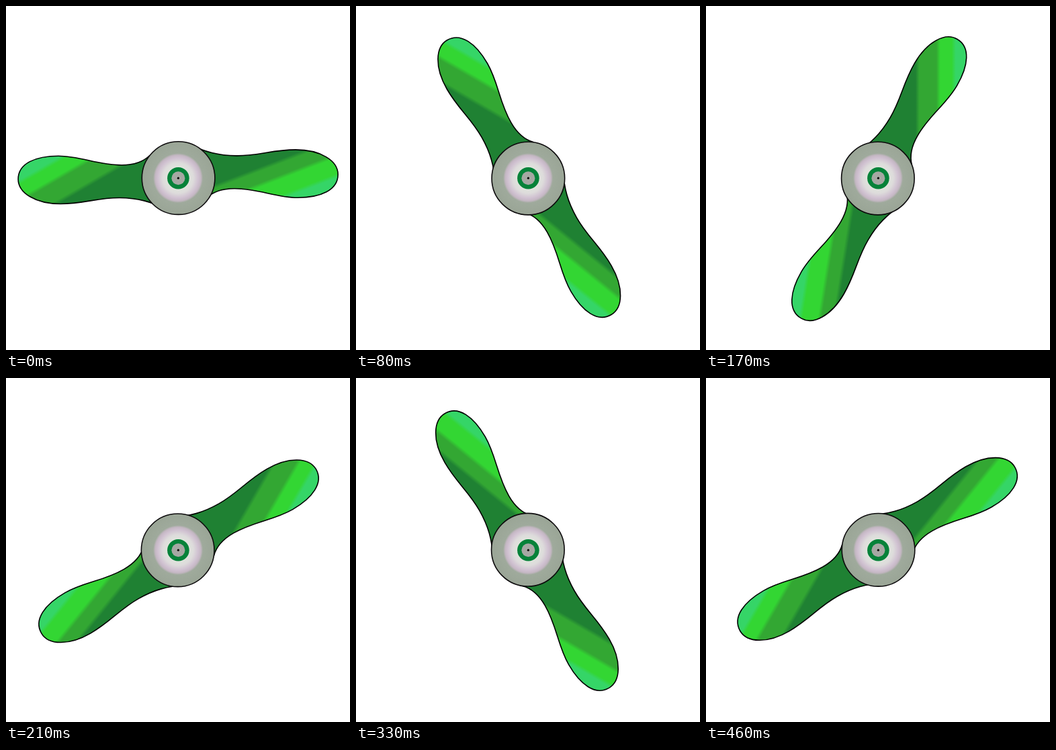
An HTML page with a canvas that plays this animation: 512x512 px, repeating every 0.5 s.

```html
<!DOCTYPE html>
<html lang="en">
<head>
<meta charset="utf-8">
<title>Propeller</title>
<style>
  html, body { margin: 0; width: 100%; height: 100%; overflow: hidden; background: #fff; }
  canvas { display: block; width: 512px; height: 512px; }
</style>
</head>
<body>
<canvas id="stage" width="512" height="512"></canvas>
<script>
const ctx = document.getElementById('stage').getContext('2d');
const LOOP = 500;
const STEP_TIMES = [0, 40, 80, 130, 170, 210, 250, 290, 330, 380, 420, 460];
const CENTER = 256.1;
const SHADES = ['#1f8133', '#33a733', '#33d633', '#35d567'];

const bladePath = new Path2D(
  'M17 -48.5 C40 -37 60 -31.5 87 -31.3 C120 -31 140 -40.3 175 -40.3 ' +
  'C212 -40.3 238 -24 238 -3.5 C238 20 212 31 178 31 ' +
  'C145 31 120 17.5 84 17.5 C68 17.5 53 21 42 32');

// Colour bands at a slant, with slightly soft edges at the given distances.
function bandGradient(degrees, edges) {
  const length = 140, soft = 3;
  const angle = degrees * Math.PI / 180;
  const gradient = ctx.createLinearGradient(
    0, 0, length * Math.sin(angle), length * Math.cos(angle));
  edges.forEach((edge, i) => {
    gradient.addColorStop((edge - soft) / length, SHADES[i]);
    gradient.addColorStop((edge + soft) / length, SHADES[i + 1]);
  });
  return gradient;
}

function hubGradient() {
  const radius = 54.5;
  const gradient = ctx.createRadialGradient(0, 0, 0, 0, 0, radius);
  const stops = [[16, '#e0e4dd'], [23, '#dddbdb'], [30, '#d0c1d1'],
                 [34, '#c4b7c3'], [37, '#9faa9c'], [54, '#9aa596']];
  stops.forEach(([r, color]) => gradient.addColorStop(r / radius, color));
  return gradient;
}

const rightFill = bandGradient(21, [33, 55, 83]);
const leftFill = bandGradient(30, [57, 88, 111]);
const hubFill = hubGradient();

function disc(x, y, radius, fill, stroke) {
  ctx.beginPath();
  ctx.arc(x, y, radius, 0, 2 * Math.PI);
  ctx.fillStyle = fill;
  ctx.fill();
  if (stroke) {
    ctx.strokeStyle = stroke;
    ctx.stroke();
  }
}

function drawBlade(fill) {
  ctx.fillStyle = fill;
  ctx.fill(bladePath);
  ctx.strokeStyle = '#000';
  ctx.stroke(bladePath);
}

function draw(time) {
  const step = STEP_TIMES.findLastIndex(start => start <= time);
  const angle = step * Math.PI / 6;

  ctx.setTransform(1, 0, 0, 1, 0, 0);
  ctx.fillStyle = '#fff';
  ctx.fillRect(0, 0, 512, 512);
  ctx.lineWidth = 1.6;

  // The blades sit slightly off the axis, so they wobble as they turn.
  ctx.translate(CENTER, CENTER);
  ctx.save();
  ctx.rotate(angle);
  ctx.translate(0, -1.9);
  drawBlade(rightFill);
  ctx.rotate(Math.PI);
  drawBlade(leftFill);
  ctx.restore();

  disc(0.5 * Math.cos(angle), 0.5 * Math.sin(angle), 54.3, hubFill, '#0c0a0c');
  disc(0.3, 0.1, 16.3, '#068239');
  disc(0.3, 0.1, 10, '#a5a8a3');
  disc(0.3, 0.1, 1.6, '#000');
}

function frame() {
  draw(performance.now() % LOOP);
  requestAnimationFrame(frame);
}
frame();
</script>
</body>
</html>
```
